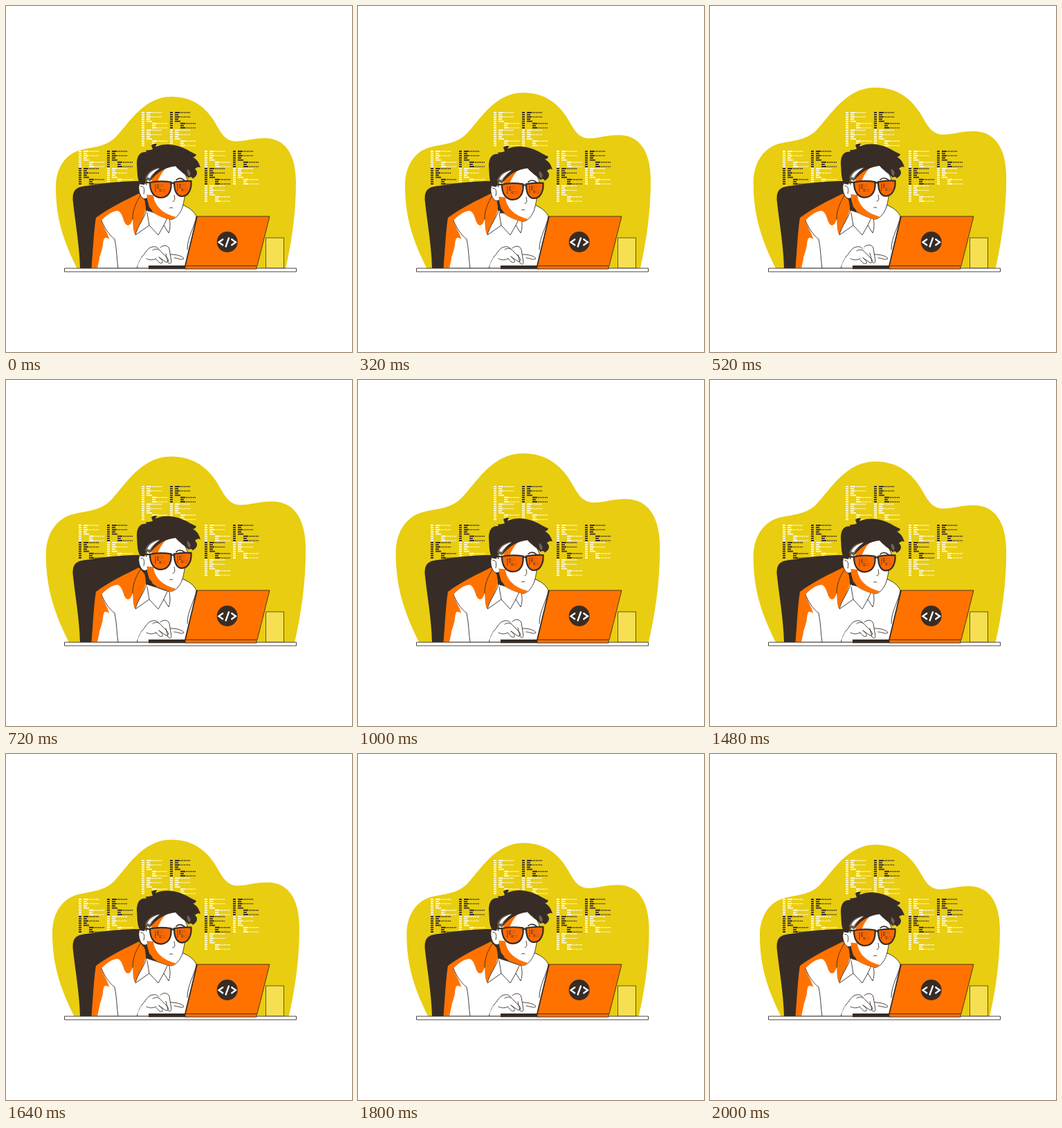
An HTML page that plays this animation: 500 by 500 pixels, repeating every 2.04 s.

```html
<!DOCTYPE html>
<html lang="en">
<head>
<meta charset="utf-8">
<title>Programmer at work</title>
<style>
  html, body { margin: 0; width: 100%; height: 100%; overflow: hidden; background: #fff; }
  svg { display: block; width: 100vw; height: 100vh; }
  .dark { fill: #372d26; }
  .orange { fill: #ff7200; }
  .white { fill: #fff; }
  .grey { fill: #6f6257; }
  .line { fill: none; stroke: #372d26; stroke-width: .9; stroke-linejoin: round; stroke-linecap: round; }
  .bold { stroke-width: 1.6; }
  .edge { stroke: #372d26; stroke-width: .9; stroke-linejoin: round; }
</style>
</head>
<body>
<svg viewBox="0 0 500 500">
  <defs>
    <g id="code" fill="none" stroke="currentColor"></g>
    <path id="lensL" d="M208 254.500 C217 252.500 229 252.500 238.500 254 C239.500 265 236 276 224 276.500 C213 276.500 208 267 208 254.500Z"/>
    <path id="lensR" d="M243 254 C251 252.500 260 252 267.500 252.500 C268.500 263 264 274 255 274.500 C246 275 243 265 243 254Z"/>
  </defs>

  <path id="blob" fill="#e9cd10" d="M103 380 C86 345 72 312 72 262 C72 232 88 212 110 207.500 C130 203 144 203 158 190
    C176 172 198 131 239 131 C268 131 287 145 300 165 C309 179 314 194 330 195.500 C346 196 354 191 374 191
    C404 191 419 215 419 255 C419 302 412 345 404 380Z"/>
  <g id="blocks"></g>

  <!-- chair -->
  <path class="dark" d="M107 379 C106 345 100 312 97 284 C95 266 101 261.500 116 260 C142 255.500 170 253 194 253
    L206 272 L205 295 L140 320 L124 379Z"/>

  <!-- shirt -->
  <path class="white edge" d="M124 379 C126 350 127 325 130 307 C150 292 174 281 192 272 L204 298 L250 286
    C263 289 273 297 276 306 L262 379Z"/>
  <path class="orange" d="M123.500 379 C126 350 127 325 130 306 C150 291 174 280 192 271 L200 280 C204 289 202 296 198 306
    C195 317 191 326 186 330 C183 323 184 316 183 308 C180 318 175 320 171 312 C168 303 166 296 160 296
    C152 297 143 304 138 310 C140 319 147 327 149 337 C143 333 141 334 140 345 C139 354 135 361 135 365 L132 379Z"/>
  <path class="line" d="M138 310 C142 320 149 331 157 337 C160 350 160 366 162 379 M189 379 C191 373 193 368 196 363
    M275 304 C273 319 262 333 262 352 M194 274 C188 284 183 294 183 308"/>
  <path class="dark" d="M199 268 L203 298 L218 299 L232 306 L215 270Z"/>
  <path class="white edge" d="M203 295 C200 307 190 318 187 331 L207 317 L220 331 L228 317 L235 328 C238 321 237 313 236 306 L215 299Z"/>
  <path class="line" d="M204 299 L207 317 M228 317 L233 306"/>

  <g id="head">
    <path class="white edge" d="M204 277 C196 282 191 268 192 260 C193 252 200 252 203 258 L205 232 L252 226 L262 250
      C259 268 258 282 254 293 C250 302 244 308 238 308 C226 305 211 299 205 290Z"/>
    <path class="line" d="M195 260 C199 259 201 264 199 271"/>
    <path class="orange" d="M203.500 272 L213 273 C214 287 226 300 245 304 C242 307 240 308 238 308 C226 306 211 299 205 290Z
      M210 253 C212 245 220 237 231 234 C225 240 221 247 219 254Z"/>
    <path class="dark" d="M203 276 L207 290 L212 296 L205 296Z"/>
    <path class="dark" d="M194 257 C189 249 190 239 189 228 C189 216 193 210 203 210.500 L202 208 C206 208 209 208 212 206.500
      L210 201 C212 199 215 198 218 199 L216 203 C226 198.500 239 198.500 249 202 C260 205 267 211 275 214 C274 217 272 218 270 218
      C276 221 279 226 281 233 C278 231 275 233 273 235 C277 238 278 244 270 249 C268 246 266 246 264 248
      C258 242 251 238 245 231 C232 232 218 239 209 252 L203 250 L200 258Z"/>
    <path class="grey" d="M201 249 C203 241 210 235 222 233 C215 239 211 245 208 253Z M262 235 C267 238 268 242 265 246 C262 243 261 239 262 235Z"/>
    <path class="white" d="M204 247 C207 240 213 236 222 234 C217 238 211 242 208 248Z"/>
    <path class="line bold" d="M246 251 C249 247.500 254 248 258 251.500"/>
    <path class="line" d="M243 273 C244 278 245 281 241 282 M236.500 291.500 C238 290.500 240 290.500 241 291.500"/>
    <g fill="#ff6a00" stroke="#372d26" stroke-width="2.200">
      <use href="#lensL"/><use href="#lensR"/>
      <path fill="none" d="M208 255 L199 254 M238 257 C239 254.500 241 254.500 243.500 257"/>
    </g>
    <g color="#372d26" opacity=".8">
      <use href="#code" transform="translate(215 257.500) scale(.43)"/>
      <use href="#code" transform="translate(247 256.500) scale(.43)"/>
    </g>
  </g>

  <!-- cup, desk, laptop -->
  <rect x="375.500" y="335" width="26" height="44" fill="#f6df50" stroke="#5a4c1a" stroke-width=".9"/>
  <rect class="white edge" x="84.500" y="379" width="335" height="5"/>
  <rect class="dark" x="206" y="375" width="56" height="5.200"/>
  <path class="orange edge" d="M259 375 H362 V380 H259Z"/>
  <path class="orange edge" d="M276 304 H381 L363 375.500 H259Z"/>
  <path class="line bold" d="M276 304.500 L259 375"/>
  <circle class="dark" cx="319.700" cy="341" r="15"/>
  <path fill="none" stroke="#fff" stroke-width="2.300" d="M314 336.700 L307.500 341.300 L314 346 M322.300 334.500 L317.300 348.500 M325.500 336.700 L332 341.300 L325.500 346"/>

  <!-- hand -->
  <path class="white" d="M190 375 L196 363 C202 357 204 349 212 348 C217 346 221 349 225 348 C230 344 235 346 236.500 351
    L238 359 C246 359 255 361 257 365 C254 368 248 364 243 364 L236 375Z"/>
  <path class="line" d="M196 363 C202 357 204 349 212 348 C216 347 219 349 221 351 M238 359 C246 359 255 361 257 365
    C254 368 248 364 243 364 M203 365 C208 368 213 367 217 365"/>
  <path id="fingerA" class="line" d="M212 353 C217 349 222 352 225 356 L233 364 C236 368 234 371 231 370 L221 363 M221 363 C225 366 227 369 226 371 C222 373 220 369 217 366"/>
  <path id="fingerB" class="line" d="M223 349 C227 345 234 345 236 351 L239 369 C239 373 235 373 234 370 L231 358"/>
</svg>
<script>
  const LOOP = 2040, STEP = 40, BREATH = 2000, NOD = 1000, TAP = 400;
  const $ = id => document.getElementById(id);

  // Each row: start and end of the bold part, then the end of the dotted part.
  const rows = [[7, 14, 30], [7, 12, 0], [7, 14, 30], [7, 12, 0], [7, 15, 0],
                [15, 22, 37], [15, 20, 0], [15, 22, 37]];
  $('code').innerHTML = rows.map(([a, b, end], i) => {
    const y = 1 + i * 3.15;
    const dots = end ? `<path stroke-width="1.300" stroke-dasharray="1.600 .9" d="M${b + 1} ${y}H${end}"/>` : '';
    return `<path stroke-width="1.900" d="M0 ${y}h4M${a} ${y}H${b}"/>${dots}`;
  }).join('');

  const light = '#fffbe2', dark = '#372d26';
  const blocks = [
    [196, 153, light], [237, 153, dark], [196, 178.5, light], [237, 178.5, light],
    [105, 209, light], [146, 209, dark], [105, 234, dark], [146, 234, light],
    [287, 209, light], [328, 209, dark], [287, 234, dark], [328, 234, light], [287, 259, light]
  ];
  $('blocks').innerHTML = blocks.map(([x, y, color]) =>
    `<use href="#code" x="${x}" y="${y}" color="${color}"/>`).join('');

  const wave = (t, period) => Math.sin(2 * Math.PI * t / period);
  const lift = (id, y) => $(id).setAttribute('transform', `translate(0 ${y})`);

  function draw(now) {
    const t = Math.floor(now % LOOP / STEP) * STEP;
    const scale = 1 + .05 * (1 - Math.cos(2 * Math.PI * t / BREATH));
    $('blob').setAttribute('transform', `translate(246 380) scale(${scale}) translate(-246 -380)`);
    lift('head', .5 + 3.2 * wave(t, NOD));
    lift('fingerA', wave(t, TAP));
    lift('fingerB', -wave(t, TAP));
  }

  function tick() {
    draw(performance.now());
    requestAnimationFrame(tick);
  }
  tick();
</script>
</body>
</html>
```
